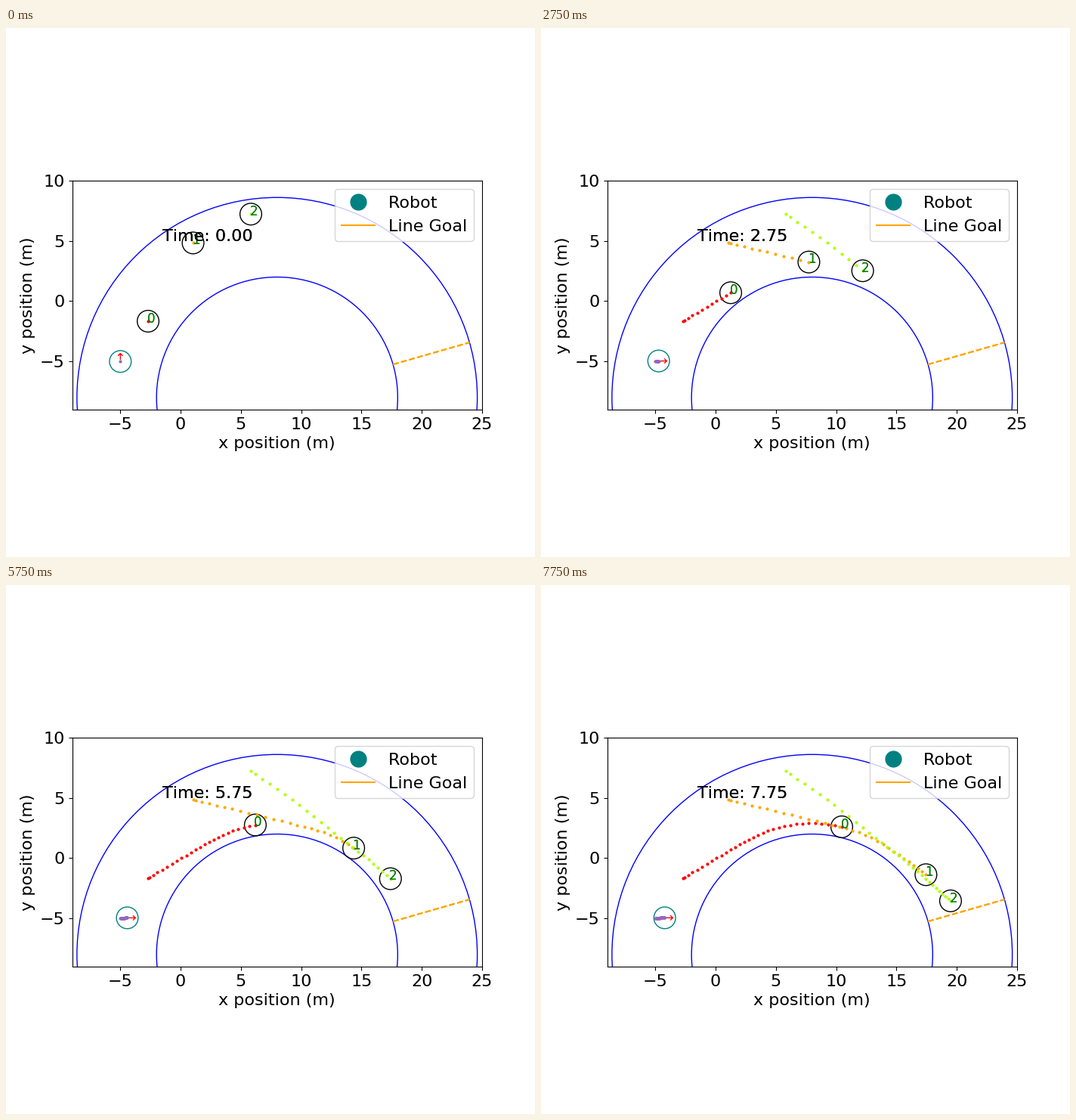
Write a matplotlib script that moves like this. It is 700 px wide and 700 px high and loops after 8 s.

```python
import numpy as np
import matplotlib.pyplot as plt
from matplotlib.animation import FuncAnimation
from matplotlib.lines import Line2D
from matplotlib.patches import ArrowStyle, Circle, FancyArrowPatch

# Whole-pixel spacing between letters
plt.rcParams["text.kerning_factor"] = 6

STEPS = 32
DT = 0.25
RADIUS = 0.9
CENTER = np.array([8, -8])
R_IN, R_OUT = 10, 16.6
STEP = np.arange(STEPS)


def walk(lag, *points):
    """Start from rest, then follow a smooth curve through evenly timed points."""
    pts = np.array(points)
    tau = STEP - lag * (1 - np.exp(-STEP / lag))
    u = tau / tau[-1] * (len(pts) - 1)
    k = np.minimum(u.astype(int), len(pts) - 2)
    u = (u - k)[:, None]
    slope = np.gradient(pts, axis=0, edge_order=2)
    return ((1 + 2 * u) * (1 - u) ** 2 * pts[k] + u * (1 - u) ** 2 * slope[k]
            + u ** 2 * (3 - 2 * u) * pts[k + 1] + u ** 2 * (u - 1) * slope[k + 1])


walkers = [
    walk(1.4, (-2.70, -1.66), (-0.19, -0.15), (2.11, 1.18),
         (4.40, 2.28), (7.24, 2.88), (10.46, 2.60)),
    walk(1.0, (1.03, 4.83), (4.95, 3.92), (9.05, 2.91),
         (12.42, 1.94), (15.22, 0.25), (17.44, -1.37)),
    walk(0.5, (5.82, 7.22), (9.61, 4.57), (13.11, 1.79),
         (15.91, -0.38), (17.98, -2.23), (19.48, -3.54)),
]
robot = np.column_stack([-5 + 0.025 * STEP, -5 + 0.055 * (1 - np.exp(-STEP / 8))])
paths = walkers + [robot]

fig, ax = plt.subplots(figsize=(7, 7), dpi=100)
ax.set_aspect("equal")
ax.set(xlim=(-9, 25), ylim=(-9, 10))
ax.set_autoscale_on(False)
ax.tick_params(labelsize=16)
ax.set_xlabel("x position (m)", fontsize=16)
ax.set_ylabel("y position (m)", fontsize=16)


def ring(center, radius, color):
    return ax.add_patch(Circle(center, radius, fill=False, edgecolor=color))


def trail(color):
    return ax.plot([], [], "o", color=color, markersize=2)[0]


def solid_text(x, y, text, **style):
    """Text painted twice, which gives it firmer edges."""
    return [ax.text(x, y, text, **style) for _ in range(2)]


for r in (R_IN, R_OUT):
    ring(CENTER, r, "blue")

angle = np.radians(16)
goal = CENTER + np.outer([R_IN, R_OUT], [np.cos(angle), np.sin(angle)])
for _ in range(2):
    ax.plot(*goal.T, "--", color="orange")

ax.legend([Line2D([], [], marker="o", linestyle="None", color="teal", markersize=15),
           Line2D([], [], color="orange")],
          ["Robot", "Line Goal"], loc="upper right", fontsize=16)

hues = plt.get_cmap("hsv", 10)
rings = [ring(p[0], RADIUS, c) for p, c in zip(paths, ["black"] * 3 + ["teal"])]
trails = [trail(c) for c in [hues(0), hues(1), hues(2), "tab:purple"]]
labels = [solid_text(0, 0, str(i), color="green", fontsize=12) for i in range(3)]
clock = solid_text(-1.5, 5, "", fontsize=16)
arrow = ax.add_patch(FancyArrowPatch((0, 0), (1, 0), color="red",
                                     arrowstyle=ArrowStyle("->", head_length=2, head_width=2)))


def update(n):
    for path, circle, dots in zip(paths, rings, trails):
        circle.center = path[n]
        dots.set_data(*path[:n + 1].T)
    for path, pair in zip(walkers, labels):
        for label in pair:
            label.set_position(path[n] - 0.1)
    for text in clock:
        text.set_text(f"Time: {n * DT:.2f}")

    # The robot faces up until it starts to move
    heading = np.array([0, 1]) if n == 0 else np.array([1, 0])
    arrow.set_positions(robot[n], robot[n] + RADIUS * heading)
    return []


anim = FuncAnimation(fig, update, frames=STEPS, interval=250, repeat=True, repeat_delay=0)
plt.show()
```
